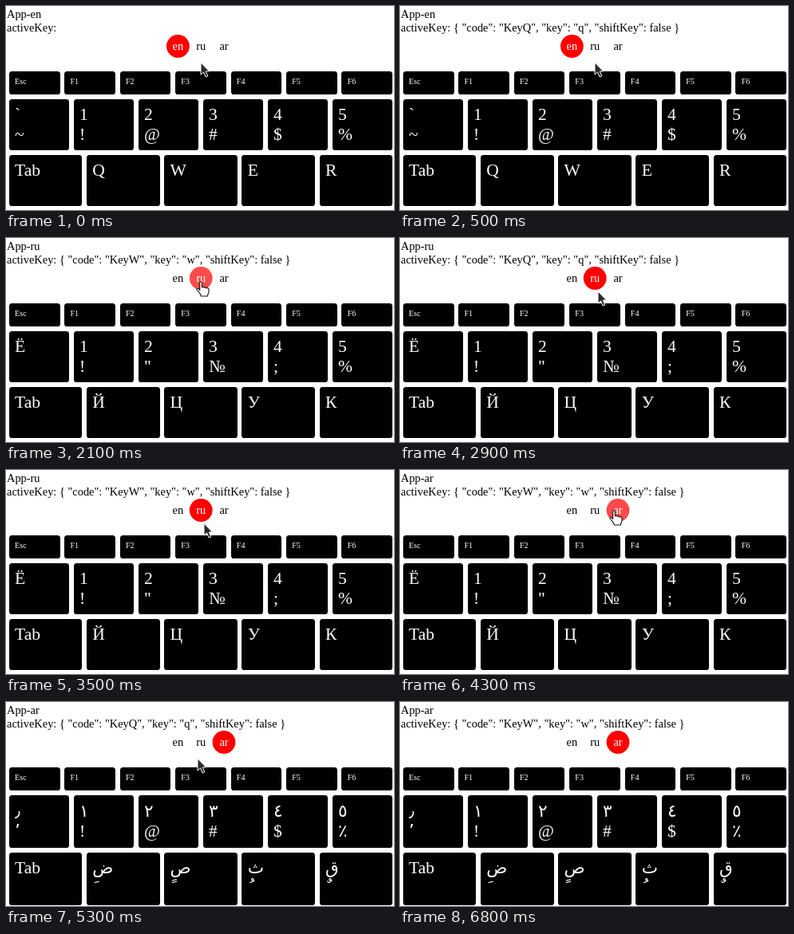
An HTML page for the animation above (7300 ms loop, 486x256 px).

```html
<!DOCTYPE html>
<html lang="en">
<head>
<meta charset="utf-8">
<title>Keyboard layouts</title>
<style>
  html, body { margin: 0; width: 100%; height: 100%; overflow: hidden; background: #fff; }
  svg { display: block; width: 486px; height: 256px; }
  text { font-family: "Liberation Serif", "DejaVu Sans", serif; font-size: 14.4px; white-space: pre; }
  .key text { font-size: 21.6px; fill: #fff; }
  .key .small { font-size: 10.08px; }
</style>
</head>
<body>
<svg id="stage" viewBox="0 0 486 256" xmlns="http://www.w3.org/2000/svg"></svg>
<script>
const LOOP = 7300;
const LANGS = ["en", "ru", "ar"];
const LAYOUTS = {
  en: [["`~", "1!", "2@", "3#", "4$", "5%"], ["Tab", "Q", "W", "E", "R"]],
  ru: [["Ё", "1!", "2\"", "3№", "4;", "5%"], ["Tab", "Й", "Ц", "У", "К"]],
  ar: [["\u066b\u066c", "\u0661!", "\u0662@", "\u0663#", "\u0664$", "\u0665\u066a"],
       ["Tab", "\u0636\u064e", "\u0635\u064b", "\u062b\u064f", "\u0642\u064c"]]
};

// Timelines: each entry holds until the next one
const LANG_AT = [[0, "en"], [1900, "ru"], [4300, "ar"]];
const KEYS_AT = [[0, "en"], [2100, "ru"], [4500, "ar"]];
const PRESSED_AT = [[0, ""], [500, "q"], [1200, "w"], [2900, "q"], [3500, "w"], [5300, "q"], [6000, "w"]];
const POINTER_AT = [
  [0, 244, 71], [1300, 245, 64], [1400, 244, 60], [1600, 244, 55],
  [2300, 246, 62], [2400, 248, 66], [2500, 248, 67],
  [3600, 250, 66], [3700, 256, 63], [3800, 263, 57], [3900, 268, 51],
  [4700, 264, 58], [4800, 250, 67], [4900, 240, 71],
  [6300, 234, 67], [6400, 196, 44], [6500, 160, 30], [6700, 104, 6], [6800, -50, -50]
];

const stage = document.getElementById("stage");

function add(parent, tag, attrs = {}, content = "") {
  const el = document.createElementNS("http://www.w3.org/2000/svg", tag);
  for (const name in attrs) el.setAttribute(name, attrs[name]);
  el.textContent = content;
  return parent.appendChild(el);
}

const at = (list, t) => list.filter(entry => entry[0] <= t).pop();

const title = add(stage, "text", { x: 1, y: 15 });
const status = add(stage, "text", { x: 1, y: 32 });

const RADIUS = 14.4, BUTTON_Y = 50.5;
const buttons = LANGS.map((lang, i) => {
  const x = 215.4 + i * 2 * RADIUS;
  const group = add(stage, "g");
  const disc = add(group, "circle", { cx: x, cy: BUTTON_Y, r: RADIUS, fill: "red" });
  const label = add(group, "text", { x, y: 55, "text-anchor": "middle" }, lang);
  return { lang, x, group, disc, label };
});

function addRow(parent, labels, y, height, baseline, small) {
  const pitch = 486 / labels.length;
  labels.forEach((label, i) => {
    const left = 3.88 + i * pitch;
    const x = Math.round(left);
    const width = Math.round(left + pitch - 5.76) - x;
    const key = add(parent, "g", { class: "key" });
    add(key, "rect", { x, y, width, height, rx: 3.6 });
    const lines = label.length > 2 || small ? [label] : [...label];
    lines.forEach((line, n) => add(key, "text",
      { x: left + 7.2, y: baseline + n * 25, class: small ? "small" : "big" }, line));
  });
}

addRow(stage, ["Esc", "F1", "F2", "F3", "F4", "F5", "F6"], 82, 29, 98, true);
const boards = LANGS.map(lang => {
  const group = add(stage, "g");
  const extra = lang === "ar" ? 2 : 0;
  const [digits, letters] = LAYOUTS[lang];
  addRow(group, digits, 117, 64 + extra, 143 + extra / 2);
  addRow(group, letters, 187 + extra, 64 + extra, 213 + extra);
  return { lang, group };
});

const pointer = add(stage, "g");
const shapes = {
  arrow: add(pointer, "path", {
    d: "M0 0V15.2L3.5 12L6.1 18L8.9 16.8L6.3 11H10.6Z",
    fill: "#2a2a2a", stroke: "#fff", "stroke-width": 1
  }),
  hand: add(pointer, "path", {
    d: "M-1.3 1.2C-1.3-.8 1.4-.8 1.4 1.2V7C1.7 6 3.9 6 4.1 7.3C4.6 6.5 6.5 6.7 6.8 7.9" +
       "C7.4 7.3 10 7.6 10 9.5V12C10 14.5 8.6 15.4 8.4 18H.3C.3 15.5-3 12.5-4.9 10" +
       "C-5.6 8.7-4 7.7-2.9 8.7L-1.3 10.4Z",
    fill: "#fff", stroke: "#111", "stroke-width": 1.1, "stroke-linejoin": "round"
  }),
  beam: add(pointer, "path", {
    d: "M-3.5-7.5Q0-7.5 0-5.5Q0-7.5 3.5-7.5M0-6V6M-3.5 7.5Q0 7.5 0 5.5Q0 7.5 3.5 7.5",
    fill: "none", stroke: "#222", "stroke-width": 1.2
  })
};

const show = (el, on) => el.setAttribute("display", on ? "inline" : "none");

function statusText(key) {
  if (!key) return "activeKey:";
  return `activeKey: { "code": "Key${key.toUpperCase()}", "key": "${key}", "shiftKey": false }`;
}

function draw(t) {
  const lang = at(LANG_AT, t)[1];
  const board = at(KEYS_AT, t)[1];
  const [, x, y] = at(POINTER_AT, t);

  title.textContent = "App-" + lang;
  status.textContent = statusText(at(PRESSED_AT, t)[1]);

  let shape = y > 20 && y < 36 ? "beam" : "arrow";
  for (const b of buttons) {
    const hover = Math.hypot(x - b.x, y - BUTTON_Y) < RADIUS;
    if (hover) shape = "hand";
    b.group.setAttribute("opacity", hover ? 0.7 : 1);
    b.label.setAttribute("fill", b.lang === lang ? "#fff" : "#000");
    show(b.disc, b.lang === lang);
  }
  for (const b of boards) show(b.group, b.lang === board);

  pointer.setAttribute("transform", `translate(${x} ${y})`);
  for (const name in shapes) show(shapes[name], name === shape);
}

const start = performance.now();
function tick() {
  draw((performance.now() - start) % LOOP);
  requestAnimationFrame(tick);
}
tick();
</script>
</body>
</html>
```
